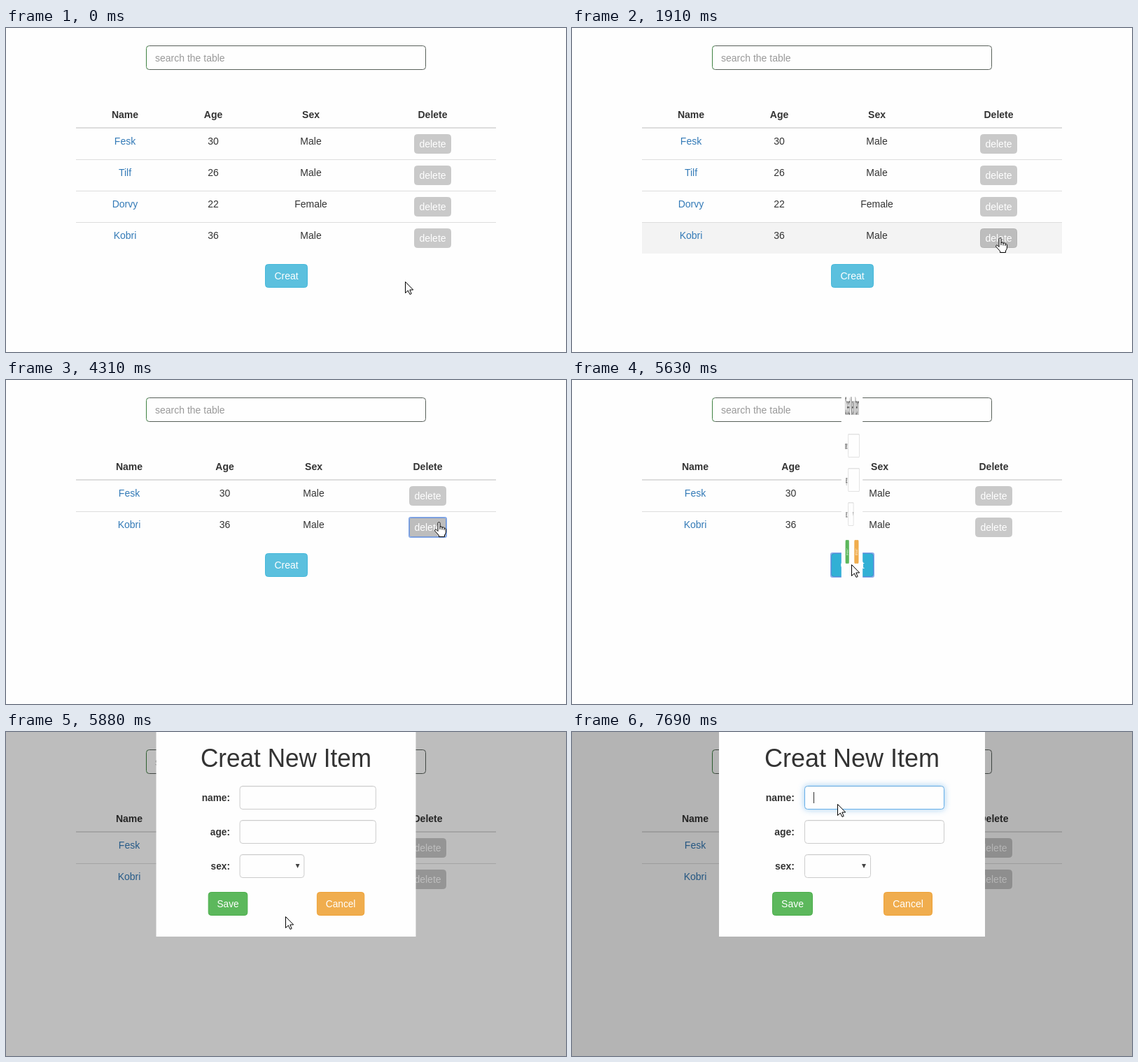
Recreate the animation shown at these times as an HTML page with a canvas. Size 800x464 px, loop 8000 ms.

```html
<!DOCTYPE html>
<html lang="en">
<head>
<meta charset="utf-8">
<title>Editable table</title>
<style>
  html, body { margin: 0; width: 100%; height: 100%; overflow: hidden; background: #fefefe; }
  canvas { display: block; width: 800px; height: 464px; }
</style>
</head>
<body>
<canvas id="stage" width="800" height="464"></canvas>
<script>
const ctx = document.getElementById('stage').getContext('2d');
const LOOP = 8000;
const PAGE = '#fefefe', INK = '#333', LINE = '#ddd';
const FONT = '"Liberation Sans", Arial, sans-serif';

const PEOPLE = [
  ['Fesk', '30', 'Male'],
  ['Tilf', '26', 'Male'],
  ['Dorvy', '22', 'Female'],
  ['Kobri', '36', 'Male'],
];
const HEADS = ['Name', 'Age', 'Sex', 'Delete'];
const WIDE = [170, 296, 435.5, 609.5];    // column centres with "Female" shown
const NARROW = [176, 312.5, 439.5, 602.5];

// Each step changes part of the state; the rest carries over.
const STEPS = [
  [0, { shown: [0, 1, 2, 3], cols: WIDE, row: -1, hot: -1, focus: -1, press: false,
        open: 0, shade: 0, glow: 0, caret: false, cursor: ['arrow', 570, 363] }],
  [960, { cursor: ['arrow', 572, 360] }],
  [1080, { cursor: ['arrow', 575, 356] }],
  [1230, { cursor: ['arrow', 578, 353] }],
  [1360, { cursor: ['arrow', 585, 348] }],
  [1510, { cursor: ['arrow', 594, 338] }],
  [1630, { cursor: ['arrow', 607, 325] }],
  [1780, { row: 3, hot: 3, cursor: ['hand', 606, 306] }],
  [1910, { cursor: ['hand', 605, 300] }],
  [2310, { hot: -1, cursor: ['arrow', 614, 279] }],
  [2460, { row: 1, hot: 1, cursor: ['hand', 615, 202] }],
  [2860, { shown: [0, 2, 3], focus: 1 }],
  [3700, { cursor: ['hand', 612, 203] }],
  [4310, { shown: [0, 3], cols: NARROW, row: -1 }],
  [4430, { hot: -1, cursor: ['arrow', 560, 235] }],
  [4560, { cursor: ['arrow', 466, 252] }],
  [4680, { cursor: ['hand', 402, 261] }],
  [4830, { cursor: ['hand', 394, 264] }],
  [5360, { focus: -1, press: true }],
  [5630, { open: 0.08, cursor: ['arrow', 399, 264] }],
  [5750, { open: 0.642, shade: 0.134 }],
  [5880, { open: 0.976, shade: 0.26 }],
  [6030, { open: 1, shade: 0.295 }],
  [6310, { cursor: ['arrow', 397, 234] }],
  [6430, { cursor: ['arrow', 387, 152] }],
  [6550, { cursor: ['beam', 378, 96] }],
  [6700, { glow: 0.5, caret: true, cursor: ['arrow', 379, 103] }],
  [6860, { glow: 1 }],
  [7260, { caret: false }],
  [7690, { caret: true }],
];

const CURSORS = {
  arrow: new Path2D('M.5 .5V16.5L4.3 13L7 18.5L9.2 17.5L6.8 12H11.7Z'),
  hand: new Path2D('M5 13.5V2.5Q5 .5 6.5 .5Q8 .5 8 2.5V7.5Q8.5 6.6 10 7Q11 7.2 11 8.4' +
    'Q12 7.4 13.2 8Q14 8.5 14 9.4Q15.6 8.8 16.3 10L16.5 14Q16.5 17 14.5 19V21.5H6.5V19.5' +
    'L1 13.5Q-.2 11.5 1.5 11Q3 11 5 13.5Z'),
  beam: new Path2D('M1 .5H3.5L4.5 1.5L5.5 .5H8M4.5 1.5V14.5M1 15.5H3.5L4.5 14.5L5.5 15.5H8'),
};
const KNUCKLES = new Path2D('M8 7V11M11 8V11.5M14 9.5V12');

function stateAt(time) {
  const state = {};
  for (const [start, change] of STEPS) {
    if (start > time) break;
    Object.assign(state, change);
  }
  return state;
}

function text(str, x, mid, { color = INK, size = 14, bold = false, align = 'center' } = {}) {
  ctx.font = `${bold ? 'bold ' : ''}${size}px ${FONT}`;
  ctx.textAlign = align;
  ctx.fillStyle = color;
  ctx.fillText(str, x, mid + Math.round(size * 0.35));
}

function rect(x, y, w, h, color) {
  ctx.fillStyle = color;
  ctx.fillRect(x, y, w, h);
}

// Box with a one pixel border lying inside its bounds.
function box(x, y, w, h, fill, border) {
  ctx.beginPath();
  ctx.roundRect(x + 0.5, y + 0.5, w - 1, h - 1, 4);
  ctx.fillStyle = fill;
  ctx.fill();
  ctx.lineWidth = 1;
  ctx.strokeStyle = border;
  ctx.stroke();
}

function button(label, x, y, w, h, fill, border) {
  box(x, y, w, h, fill, border);
  text(label, x + w / 2, y + h / 2, { color: '#fff' });
}

function ring(x, y, w, h) {
  ctx.beginPath();
  ctx.roundRect(x, y, w, h, 2);
  ctx.lineWidth = 2;
  ctx.strokeStyle = 'rgba(94,142,226,.75)';
  ctx.stroke();
}

function drawSearch() {
  const edge = ctx.createLinearGradient(200, 0, 206, 0);
  edge.addColorStop(0, '#3c863f');
  edge.addColorStop(1, '#58605a');
  box(200, 25, 400, 35, PAGE, edge);
  text('search the table', 213, 43, { color: '#999', align: 'left' });
}

function drawTable(s) {
  HEADS.forEach((head, i) => text(head, s.cols[i], 124, { bold: true }));
  s.shown.forEach((id, i) => {
    const top = 144 + 45 * i;
    if (s.row === i) rect(100, top, 600, 44, '#f3f3f3');
    if (i) rect(100, top - 1, 600, 1, LINE);
    PEOPLE[id].forEach((value, c) =>
      text(value, s.cols[c], top + 18, { color: c ? INK : '#337ab7' }));
    const x = Math.floor(s.cols[3]) - 26;
    const hot = s.hot === i;
    button('delete', x, top + 8, 53, 28, hot ? '#bdbdbd' : '#c9c9c9', hot ? '#b4b4b4' : '#c9c9c9');
    if (s.focus === i) ring(x, top + 8, 53, 28);
  });
  rect(100, 142, 600, 2, LINE);

  const y = 158 + 45 * s.shown.length;
  button('Creat', 370, y, 61, 34, s.press ? '#31b0d5' : '#5bc0de', s.press ? '#269abc' : '#46b8da');
  if (s.press) ring(370, y, 61, 34);
}

function drawField(y, w, glow = 0) {
  if (glow) {
    ctx.save();
    ctx.shadowColor = `rgba(102,175,233,${0.6 * glow})`;
    ctx.shadowBlur = 8;
    box(332, y, w, 34, '#fff', LINE);
    ctx.restore();
  }
  box(332, y, w, 34, PAGE, glow === 1 ? '#66afe9' : glow ? '#99bddb' : '#ccc');
  rect(335, y + 1, w - 6, 1, 'rgba(0,0,0,.05)');
}

function drawDialog(s) {
  ctx.save();
  ctx.translate(400, 0);
  ctx.scale(s.open, 1);
  ctx.translate(-400, 0);
  rect(210, 0, 380, 293, PAGE);
  text('Creat New Item', 400, 37, { size: 36 });
  ['name:', 'age:', 'sex:'].forEach((label, i) =>
    text(label, 318, 94 + 49 * i, { bold: true, align: 'right' }));
  drawField(77, 200, s.glow);
  drawField(126, 200);
  drawField(175, 95);
  ctx.beginPath();
  ctx.moveTo(414, 189);
  ctx.lineTo(420, 189);
  ctx.lineTo(417, 195);
  ctx.fillStyle = '#444';
  ctx.fill();
  button('Save', 286, 229, 58, 34, '#5cb85c', '#4cae4c');
  button('Cancel', 445, 229, 70, 34, '#f0ad4e', '#eea236');
  if (s.caret) rect(345, 86, 1, 16, INK);
  ctx.restore();
}

function drawCursor([kind, x, y]) {
  ctx.save();
  ctx.translate(x, y);
  ctx.lineWidth = 1;
  ctx.strokeStyle = '#000';
  if (kind !== 'beam') {
    ctx.fillStyle = '#fff';
    ctx.fill(CURSORS[kind]);
  }
  ctx.stroke(CURSORS[kind]);
  if (kind === 'hand') ctx.stroke(KNUCKLES);
  ctx.restore();
}

function draw(time) {
  const s = stateAt(time);
  rect(0, 0, 800, 464, PAGE);
  drawSearch();
  drawTable(s);
  if (s.shade) rect(0, 0, 800, 464, `rgba(0,0,0,${s.shade})`);
  if (s.open) drawDialog(s);
  drawCursor(s.cursor);
}

const start = performance.now();
function tick() {
  draw((performance.now() - start) % LOOP);
  requestAnimationFrame(tick);
}
tick();
</script>
</body>
</html>
```
